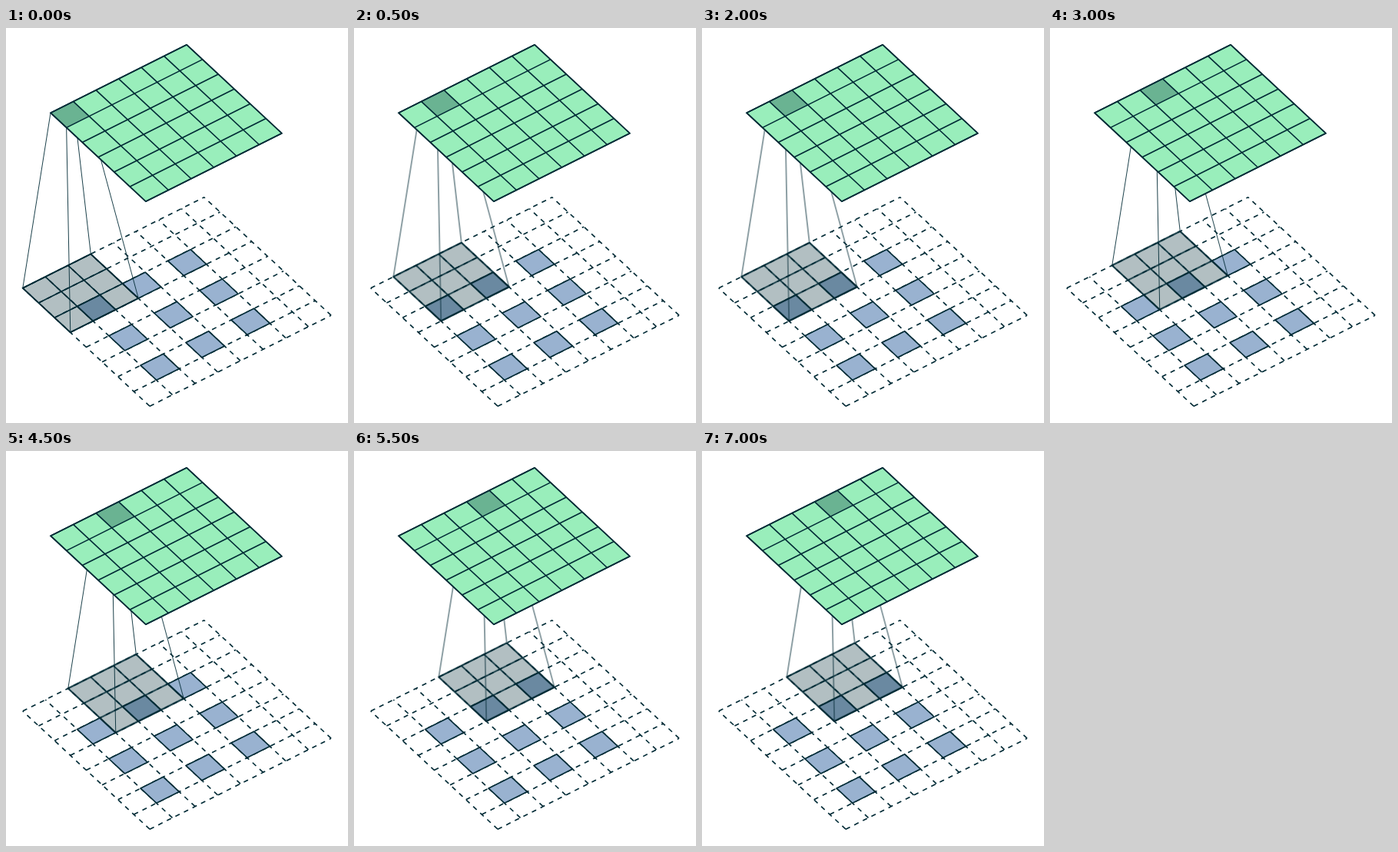
These frames come from a looping animation (445x513 px, 8 s). An HTML page:

```html
<!DOCTYPE html>
<html lang="en">
<head>
<meta charset="utf-8">
<title>Sliding kernel</title>
<style>
  html, body { margin: 0; width: 100%; height: 100%; overflow: hidden; background: #fff; }
  svg { display: block; width: 445px; height: 513px; }
  path { fill: none; stroke: #002b36; stroke-width: 1.66; stroke-linejoin: miter; }
  .dash { stroke-dasharray: 6.22 6.22; }
  .ray { stroke-width: .9; }
  .in, .out, .shade { stroke: none; }
  .in { fill: #99b2d0; }
  .out { fill: #99eebb; }
  .shade { fill: #002b36; fill-opacity: .3; }
</style>
</head>
<body>
<svg id="stage" viewBox="0 0 445 513"></svg>
<script>
const UNIT = 29.5;
const U = [UNIT, -UNIT * .5];
const V = [UNIT * .7, UNIT * .65];
const LOOP = 8000;
const STEPS = [0, 500, 3000, 5500];

const stage = document.getElementById('stage');

// Maps grid coordinates of a plane to "x,y" on the stage.
const plane = (x, y) => (i, j) =>
  `${(x + i * U[0] + j * V[0]).toFixed(2)},${(y + i * U[1] + j * V[1]).toFixed(2)}`;
const lower = plane(21.8, 337.8);
const upper = plane(58, 110.2);

function add(tag, parent, attrs = {}) {
  const el = document.createElementNS('http://www.w3.org/2000/svg', tag);
  for (const key in attrs) el.setAttribute(key, attrs[key]);
  return parent.appendChild(el);
}

const draw = (parent, d, cls = '') => add('path', parent, { d, class: cls });
const line = (a, b) => `M${a}L${b}`;
const quad = (at, i, j, n) =>
  `M${at(i, j)}L${at(i + n, j)}L${at(i + n, j + n)}L${at(i, j + n)}Z`;

function grid(at, n) {
  let d = '';
  for (let k = 0; k <= n; k++) {
    d += line(at(0, k), at(n, k)) + line(at(k, n), at(k, 0));
  }
  return d;
}

// Input plane with spread-out cells
draw(stage, grid(lower, 8), 'dash');
for (const j of [2, 4, 6]) {
  for (const i of [1, 3, 5]) {
    const cell = quad(lower, i, j, 1);
    draw(stage, cell, 'in');
    draw(stage, cell);
  }
}

// Kernel window and its projection rays
const kernel = add('g', stage);
draw(kernel, quad(lower, 0, 0, 3), 'shade');
draw(kernel, grid(lower, 3));
draw(kernel, quad(lower, 0, 0, 3));
for (const [i, j] of [[0, 0], [1, 0], [0, 1], [1, 1]]) {
  draw(kernel, line(lower(3 * i, 3 * j), upper(i, j)), 'ray');
}

// Output plane with the active cell
draw(stage, quad(upper, 0, 0, 6), 'out');
const active = add('g', stage);
draw(active, quad(upper, 0, 0, 1), 'shade');
draw(stage, grid(upper, 6));
draw(stage, quad(upper, 0, 0, 6));

const place = k => `translate(${k * U[0]}px, ${k * U[1]}px)`;
const frames = STEPS.map((t, k) => ({
  offset: t / LOOP, transform: place(k), easing: 'step-end'
}));
frames.push({ offset: 1, transform: place(STEPS.length - 1) });

for (const el of [kernel, active]) {
  el.animate(frames, { duration: LOOP, iterations: Infinity });
}
</script>
</body>
</html>
```
